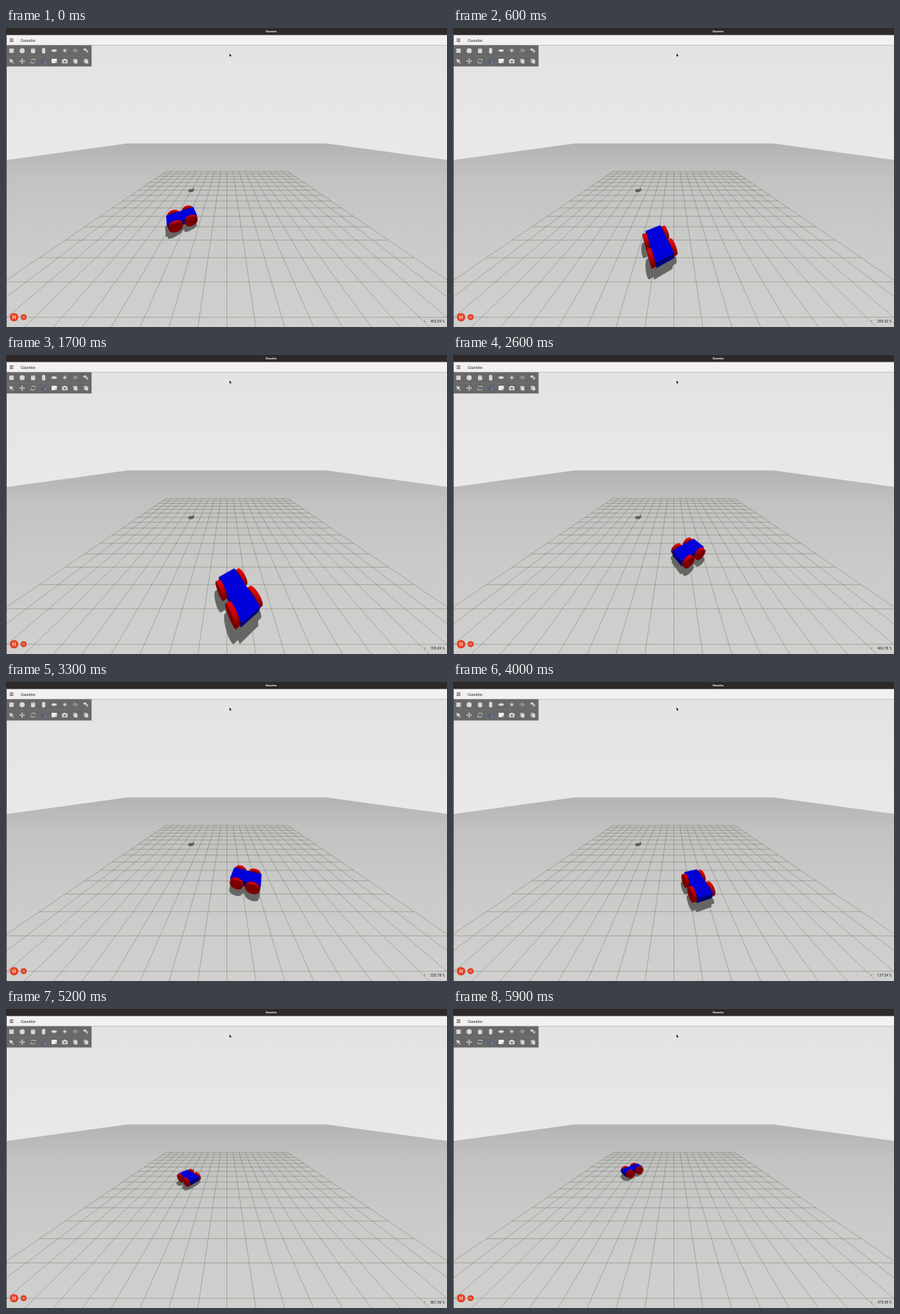
An HTML page with a canvas that plays this animation: 600 by 408 pixels, repeating every 6 s.

```html
<!DOCTYPE html>
<html lang="en">
<head>
<meta charset="utf-8">
<title>Gazebo</title>
<style>
html, body { margin: 0; width: 100%; height: 100%; overflow: hidden; }
canvas { display: block; width: 600px; height: 408px; }
</style>
</head>
<body>
<canvas id="stage" width="600" height="408"></canvas>
<script>
const ctx = document.getElementById('stage').getContext('2d');
const TAU = Math.PI * 2, LOOP = 6000, STEP = 100;

// Camera 6 m above the ground, pitched down by 0.5 rad. World: [right, ahead, up].
const FOCAL = 140.4, CX = 300.5, CY = 215.8, EYE = 6;
const COS = Math.cos(0.5), SIN = Math.sin(0.5);
const SUN = [0.1, 0.5, 0.9];

// [ms, right, ahead, heading in degrees, real-time factor]
const poses = [
  [0, -3.22, 5.44, 30, 493.09],
  [1100, 0.57, 1.67, -140, 355.41],
  [1700, 0.475, 2.42, -240, 709.69],
  [2600, 0.96, 4.84, -325, 460.78],
  [4000, 1.445, 4.37, -433, 137.04],
  [5200, -3.63, 8.2, -579, 581.56],
  [5900, -4.45, 9.55, -672, 475.59]
];

function project([x, y, z]) {
  const h = EYE - z, depth = y * COS + h * SIN;
  return [CX + FOCAL * x / depth, CY + FOCAL * (h * COS - y * SIN) / depth];
}

function trace(points, close = true) {
  ctx.beginPath();
  points.forEach(p => ctx.lineTo(p[0], p[1]));
  if (close) ctx.closePath();
}

function fill(points, color) {
  trace(points);
  ctx.fillStyle = color;
  ctx.fill();
}

function line(points, color, width) {
  trace(points, false);
  ctx.strokeStyle = color;
  ctx.lineWidth = width;
  ctx.stroke();
}

function rect(x, y, w, h, color) {
  ctx.fillStyle = color;
  ctx.fillRect(x, y, w, h);
}

function oval(x, y, rx, ry, color) {
  ctx.beginPath();
  ctx.ellipse(x, y, rx, ry, 0, 0, TAU);
  ctx.fillStyle = color;
  ctx.fill();
}

function text(str, x, y, font, color, align = 'left') {
  ctx.font = font;
  ctx.fillStyle = color;
  ctx.textAlign = align;
  ctx.fillText(str, x, y);
}

function gradient(y0, y1, stops) {
  const g = ctx.createLinearGradient(0, y0, 0, y1);
  stops.forEach(([at, color]) => g.addColorStop(at, color));
  return g;
}

function hull(points) {
  const sorted = [...points].sort((a, b) => a[0] - b[0] || a[1] - b[1]);
  const half = list => {
    const out = [];
    for (const p of list) {
      while (out.length > 1) {
        const [a, b] = out.slice(-2);
        if ((b[0] - a[0]) * (p[1] - a[1]) - (b[1] - a[1]) * (p[0] - a[0]) > 0) break;
        out.pop();
      }
      out.push(p);
    }
    return out.slice(0, -1);
  };
  return [...half(sorted), ...half(sorted.reverse())];
}

const RAD = Math.PI / 180;

function legSpeed(i) {
  const [a, b] = [poses[i], poses[i + 1]];
  return a && b ? Math.hypot(b[1] - a[1], b[2] - a[2]) / (b[0] - a[0]) : 0;
}

// Velocity along the heading; at rest at both ends, harmonic mean of the legs between.
function velocityAt(i) {
  const before = legSpeed(i - 1), after = legSpeed(i), heading = poses[i][3] * RAD;
  const speed = 2 * before * after / (before + after);
  return [speed * Math.cos(heading), speed * Math.sin(heading)];
}

function poseAt(t) {
  let i = 0;
  while (i < poses.length - 2 && t >= poses[i + 1][0]) i++;
  const [t0, x0, y0, a0, f0] = poses[i], [t1, x1, y1, a1, f1] = poses[i + 1];
  const span = t1 - t0, s = (t - t0) / span;
  const v0 = velocityAt(i), v1 = velocityAt(i + 1);
  const hermite = (p, q, m, n) =>
    p + (q - p) * s * s * (3 - 2 * s) + s * (1 - s) * ((1 - s) * m - s * n) * span;
  const wobble = Math.sin(s * Math.PI) * 90 * Math.sin(t * 0.037);
  return {
    x: hermite(x0, x1, v0[0], v1[0]),
    y: hermite(y0, y1, v0[1], v1[1]),
    angle: (a0 + (a1 - a0) * s) * RAD,
    factor: f0 + (f1 - f0) * s + wobble
  };
}

// Solids are lists of { points, normal } in car space: [forward, left, up].
function prism(base, lo, hi, place, normals) {
  const n = base.length;
  const low = base.map(p => place(p, lo)), high = base.map(p => place(p, hi));
  const sides = base.map((_, i) => {
    const j = (i + 1) % n;
    return { points: [low[i], low[j], high[j], high[i]], normal: normals.side(i) };
  });
  return [...sides,
    { points: low, normal: normals.axis.map(v => -v) },
    { points: high, normal: normals.axis }];
}

const LENGTH = 0.94, WIDTH = 0.46;  // half sizes of the body
const body = prism(
  [[LENGTH, WIDTH], [-LENGTH, WIDTH], [-LENGTH, -WIDTH], [LENGTH, -WIDTH]], 0.22, 0.69,
  (p, z) => [p[0], p[1], z],
  { side: i => [[0, 1, 0], [-1, 0, 0], [0, -1, 0], [1, 0, 0]][i], axis: [0, 0, 1] });

function makeWheel(along, side) {
  const n = 28, r = 0.41;
  const rim = Array.from({ length: n }, (_, i) =>
    [along + r * Math.cos(i * TAU / n), r + r * Math.sin(i * TAU / n)]);
  const faces = prism(rim, side * 0.58 - 0.1, side * 0.58 + 0.1,
    (p, b) => [p[0], b, p[1]],
    { side: i => [Math.cos((i + 0.5) * TAU / n), 0, Math.sin((i + 0.5) * TAU / n)], axis: [0, 1, 0] });
  return { along, side, faces };
}
const wheels = [[1, 1], [1, -1], [-1, 1], [-1, -1]].map(([a, s]) => makeWheel(a * 0.5, s));

function drawCar({ x, y, angle }) {
  const c = Math.cos(angle), s = Math.sin(angle);
  const turn = ([a, b, z]) => [a * c - b * s, a * s + b * c, z];
  const toWorld = p => {
    const q = turn(p);
    return [q[0] + x, q[1] + y, q[2]];
  };
  const shadow = faces => fill(hull(faces.flatMap(f => f.points).map(p => {
    const [u, v, z] = toWorld(p);
    return project([u - z * 0.11, v - z * 0.54, 0]);
  })), '#666664');
  const solid = (faces, paint) => {
    for (const face of faces) {
      const pts = face.points.map(toWorld), n = turn(face.normal), p = pts[0];
      if (n[0] * -p[0] + n[1] * -p[1] + n[2] * (EYE - p[2]) <= 0) continue;
      const light = Math.max(0, n[0] * SUN[0] + n[1] * SUN[1] + n[2] * SUN[2]);
      const color = paint(Math.round(122 + 108 * light));
      fill(pts.map(project), color);
      ctx.strokeStyle = color;
      ctx.lineWidth = 0.4;
      ctx.stroke();
    }
  };
  const camAlong = -x * c - y * s, camLeft = x * s - y * c;
  const inFront = w => w.side * camLeft > WIDTH;
  const distance = w => Math.abs(w.along - camAlong);
  const ordered = [...wheels].sort((a, b) => distance(b) - distance(a));
  const drawWheel = w => solid(w.faces, v => `rgb(${v},0,0)`);

  shadow(body);
  wheels.forEach(w => shadow(w.faces));
  ordered.filter(w => !inFront(w)).forEach(drawWheel);
  solid(body, v => `rgb(0,0,${v})`);
  ordered.filter(inFront).forEach(drawWheel);
}

function drawWorld() {
  rect(0, 24, 600, 160, gradient(24, 184, [[0, '#e3e3e1'], [1, '#e9e9e7']]));
  const ground = [[-50, 12], [-50, 50 + EYE], [50, 50 + EYE], [50, 12]].map(([x, y]) => project([x, y, 0]));
  fill([[0, 408], ...ground, [600, 408]],
    gradient(158, 408, [[0, '#b3b3b1'], [0.18, '#c2c2c0'], [0.5, '#cacac8'], [1, '#d0d0ce']]));
  const gridLine = (a, b) => line([project(a), project(b)], 'rgba(70,70,66,.5)', 0.6);
  for (let i = -10; i <= 10; i++) {
    gridLine([i, 0.5, 0], [i, 16, 0]);
    if (i > -6) gridLine([-10, i + EYE, 0], [10, i + EYE, 0]);
  }
  fill([[247.5, 221.5], [250, 219.8], [254, 220], [256, 217.8], [256, 222], [253, 224], [248.5, 223.8]], '#5e5e5c');
}

function drawToolbar() {
  const ink = '#d9d9d9', dim = '#b5b5b5';
  rect(1, 23.5, 115.4, 29, '#686868');
  rect(1, 38, 115.4, 0.5, '#777');

  rect(4.5, 28, 6, 6, ink);
  line([[4.5, 29.3], [9, 29.3], [9, 34]], dim, 0.5);
  oval(22, 31, 3.5, 3.5, ink);
  rect(34, 28.5, 5.6, 5, ink);
  oval(36.8, 33.5, 2.8, 1, ink);
  oval(36.8, 28.5, 2.8, 1, dim);
  rect(49, 29.3, 4.4, 3.6, ink);
  oval(51.2, 29.3, 2.2, 2.2, ink);
  oval(51.2, 32.8, 2.2, 2.2, ink);
  oval(65.5, 30.7, 3.7, 1.8, ink);
  oval(80, 30.7, 1.7, 1.7, ink);
  for (let i = 0; i < 8; i++) {
    const u = Math.cos(i * TAU / 8), v = Math.sin(i * TAU / 8);
    line([[80 + u * 2.3, 30.7 + v * 2.3], [80 + u * 3.5, 30.7 + v * 3.5]], ink, 0.6);
  }
  for (let i = 0; i < 3; i++) line([[91 + i * 1.6, 31.5 + i], [94.5 + i * 1.6, 28 + i]], ink, 0.8);
  oval(107.3, 29.3, 2, 1.6, ink);
  oval(110.2, 31.8, 1.8, 2, dim);

  fill([[4.5, 42], [10.5, 44.3], [8, 45.3], [10.5, 48], [9.6, 48.7], [7.1, 46.1], [6, 48]], ink);
  line([[22, 42], [22, 48.5]], ink, 0.9);
  line([[18.8, 45.2], [25.2, 45.2]], ink, 0.9);
  for (const [u, v] of [[1, 0], [-1, 0], [0, 1], [0, -1]]) {
    const tip = (a, b) => [22 + u * a - v * b, 45.2 + v * a + u * b];
    fill([tip(3.7, 0), tip(2.2, 1.4), tip(2.2, -1.4)], ink);
  }
  for (const start of [0.3, 3.44]) {
    ctx.beginPath();
    ctx.arc(36.8, 45.2, 2.8, start, start + 2.4);
    ctx.strokeStyle = ink;
    ctx.lineWidth = 0.8;
    ctx.stroke();
  }
  fill([[38.2, 43.8], [40.2, 43.8], [40.1, 42]], ink);
  fill([[33.3, 48.4], [33.4, 46.6], [35.2, 46.6]], ink);
  rect(47.8, 45.5, 1.7, 2.5, '#3d5f92');
  rect(49.8, 43.5, 1.7, 4.5, '#3d5f92');
  rect(52, 46, 1.3, 2, '#8da6cc');
  rect(62, 42, 7.2, 6, '#eee');
  rect(67, 46, 1.7, 1.4, '#777');
  rect(76.3, 43, 7.4, 5.2, ink);
  rect(78.3, 42, 3.2, 1.3, ink);
  oval(80, 45.6, 1.6, 1.6, '#777');
  rect(91.5, 42, 4.4, 5.2, dim);
  rect(92.8, 43.2, 4.4, 5.2, ink);
  rect(105.8, 42, 4.6, 5.6, dim);
  rect(108, 43.4, 3.8, 5, ink);
}

function drawChrome(factor) {
  rect(0, 0, 600, 10, '#2c2928');
  text('Gazebo', 360.7, 6.3, 'bold 4.4px Roboto, sans-serif', '#f0eeec', 'center');
  rect(0, 9.6, 600, 13.9, '#f2f1ef');
  rect(0, 23.2, 600, 0.9, '#bdbcba');
  for (let i = 0; i < 3; i++) rect(5, 14.4 + i * 1.9, 5, 0.8, '#333');
  text('Gazebo', 20, 18.7, '6px Roboto, sans-serif', '#333');
  drawToolbar();
  rect(0, 10, 1, 398, '#51454f');

  oval(11, 394.6, 5.7, 5.7, '#cf3a20');
  oval(11, 394.6, 4.9, 4.9, '#ee4526');
  rect(9, 392.5, 1.2, 4.2, '#f8e4df');
  rect(11.8, 392.5, 1.2, 4.2, '#f8e4df');
  oval(24, 394.6, 4.1, 4.1, '#e0402a');
  for (const x of [22, 24]) fill([[x, 393.2], [x + 2, 394.6], [x, 396]], '#f0a394');

  line([[570.2, 398.6], [569.2, 400], [570.2, 401.4]], '#444', 0.5);
  text(factor.toFixed(2) + ' %', 597, 401.7, '4.9px Roboto, sans-serif', '#222', 'right');

  const pointer = [[304, 34.8], [304, 39], [305, 38.2], [305.7, 39.6], [306.3, 39.3], [305.7, 37.9], [307, 37.8]];
  fill(pointer, '#111');
  line([...pointer, pointer[0]], 'rgba(255,255,255,.5)', 0.25);
}

function frame(now) {
  const t = Math.floor(now % LOOP / STEP) * STEP;
  const pose = poseAt(t);
  ctx.clearRect(0, 0, 600, 408);
  drawWorld();
  drawCar(pose);
  drawChrome(pose.factor);
  requestAnimationFrame(frame);
}
requestAnimationFrame(frame);
</script>
</body>
</html>
```
